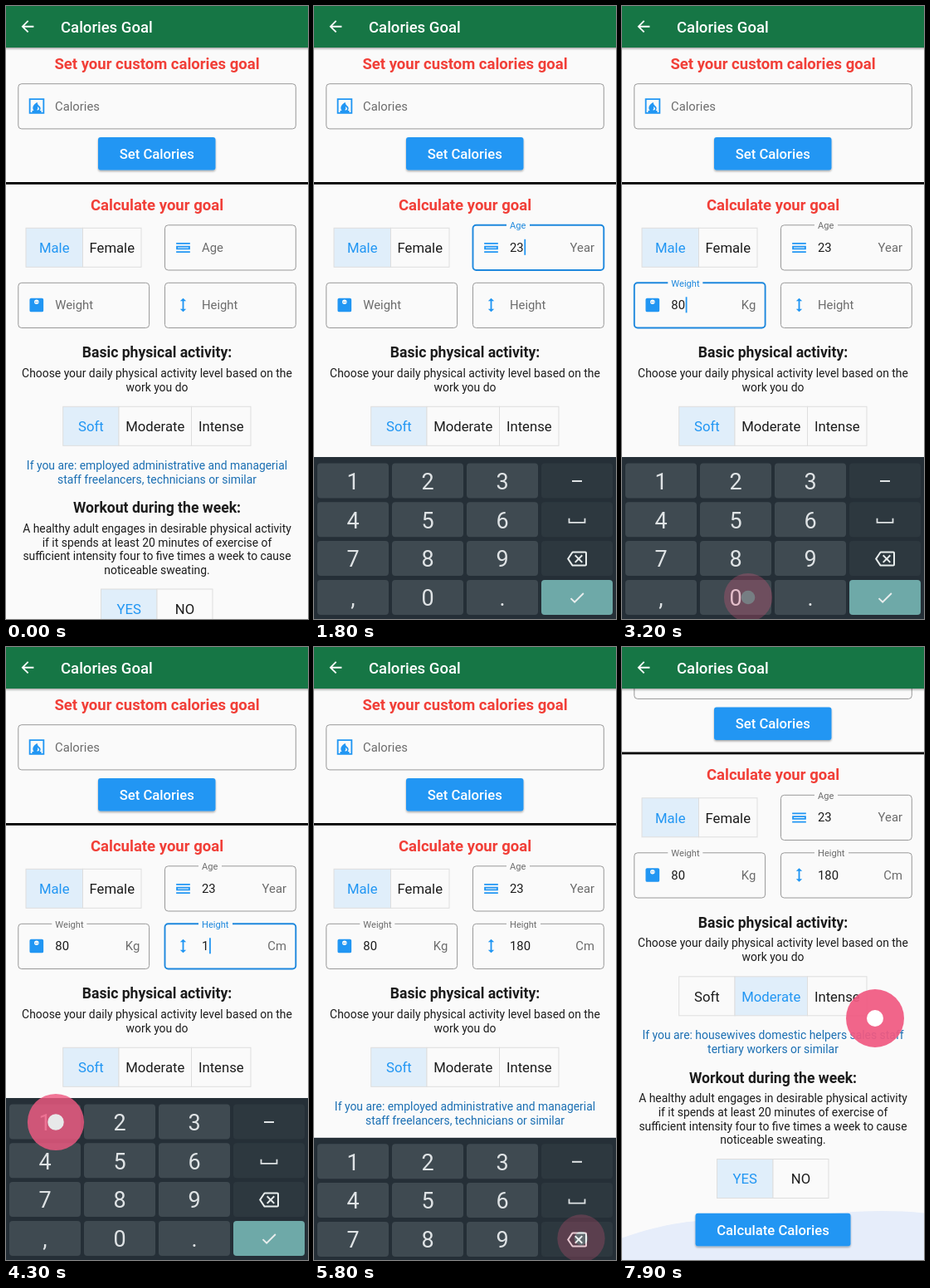
An HTML page for the animation above (8000 ms loop, 364 px wide and 738 px high).

```html
<!DOCTYPE html>
<html lang="en">
<head>
<meta charset="utf-8">
<title>Calories Goal</title>
<style>
html, body { margin: 0; height: 100%; overflow: hidden; background: #fafafa; }
svg { display: block; width: 100vw; height: 100vh; font-family: Roboto, sans-serif; }
</style>
</head>
<body>
<svg id="stage" viewBox="0 0 364 738"></svg>
<script>
const LOOP = 8000;
const BLUE = '#2196f3', INK = '#1c1c1c', GREY = '#6c6c6c', PAPER = '#fafafa';
const BODY = 13.9, LABEL = 14.83, BUTTON = 16.69, TITLE = 18.54;

// Text is placed by the middle of its capital letters.
const text = (x, y, s, size, fill = INK, extra = '') =>
  `<text x="${x}" y="${y}" dy=".355em" font-size="${size}" fill="${fill}" ${extra}>${s}</text>`;
const MID = 'text-anchor="middle"';
const centred = (x, y, s, size, fill, weight = 400, extra = '') =>
  text(x, y, s, size, fill, `${MID} font-weight="${weight}" ${extra}`);
const lines = (y, list, fill, id = '') =>
  list.map((s, i) => centred(182, y + i * 16.6, s, BODY, fill, 400, id && `id="${id}${i}"`)).join('');
const rect = (x, y, w, h, fill, extra = '') =>
  `<rect x="${x}" y="${y}" width="${w}" height="${h}" fill="${fill}" ${extra}/>`;
const icon = (x, y, d, fill = BLUE, k = .927) =>
  `<path transform="translate(${x - 12 * k} ${y - 12 * k}) scale(${k})" d="${d}" fill="${fill}" fill-rule="evenodd"/>`;
const button = (x, y, w, s) =>
  rect(x, y, w, 39.5, BLUE, 'rx="3" filter="url(#shadow)"') +
  centred(x + w / 2, y + 20, s, BUTTON, '#fff', 500);

const ICONS = {
  back: 'M20 11H7.83l5.59-5.59L12 4l-8 8 8 8 1.41-1.41L7.83 13H20v-2z',
  fire: 'M2 2v20h20V2H2zm9.86 14.96c.76-.24 1.4-1.04 1.53-1.63.13-.56-.1-1.05-.2-1.6-.08-.46-.07-.85.08-1.28.54 1.21 2.15 1.64 1.98 3.18-.19 1.69-2.11 2.37-3.39 1.33zM20 20h-2v-2h-2.02c.63-.84 1.02-1.87 1.02-3 0-1.89-1.09-2.85-1.85-3.37C12.2 9.61 13 7 13 7c-6.73 3.57-6.02 7.47-6 8 .03.96.49 2.07 1.23 3H6v2H4V4h16v16z',
  age: 'M3 17h18v2H3zM3 6h18v2H3zM3 10h18v5H3zM5 12v1h14v-1z',
  weight: 'M5 3h14q2 0 2 2v14q0 2-2 2H5q-2 0-2-2V5q0-2 2-2zM12 5a3 3 0 0 0 0 6 3 3 0 0 0 0-6zM10 7.6h1v1h-1zM11.5 7.6h1v1h-1zM13 7.6h1v1h-1z',
  height: 'M13 6.99h3L12 3 8 6.99h3v10.02H8L12 21l4-3.99h-3V6.99z',
  erase: 'M22 3H7c-.69 0-1.23.35-1.59.88L0 12l5.41 8.11c.36.53.9.89 1.59.89h15c1.1 0 2-.9 2-2V5c0-1.1-.9-2-2-2zm0 16H7.07L2.4 12l4.66-7H22v14zm-11.59-2L14 13.41 17.59 17 19 15.59 15.41 12 19 8.41 17.59 7 14 10.59 10.41 7 9 8.41 12.59 12 9 15.59z',
  check: 'M9 16.17 4.83 12l-1.42 1.41L9 19 21 7l-1.41-1.41z'
};

// Taps: time, x, y; each acts when the finger lifts.
const LIFT = 130, FADE = 250;
const TAPS = [
  [150, 270, 291], [1150, 150, 572], [1400, 240, 572],
  [2150, 100, 360], [2560, 152, 665], [2930, 152, 712],
  [3750, 270, 360], [4150, 60, 572], [4480, 152, 665], [4830, 152, 712],
  [5520, 322, 712], [6575, 195, 506]
];
const lift = i => TAPS[i][0] + LIFT;

const FIELDS = [
  { id: 'age', x: 191.5, y: 263.8, label: 'Age', gap: 28, unit: 'Year', value: '23', on: lift(0), off: lift(3), keys: [lift(1), lift(2)] },
  { id: 'weight', x: 14.8, y: 333.3, label: 'Weight', gap: 42, unit: 'Kg', value: '80', on: lift(3), off: lift(6), keys: [lift(4), lift(5)] },
  { id: 'height', x: 191.5, y: 333.3, label: 'Height', gap: 41, unit: 'Cm', value: '180', on: lift(6), off: lift(10), keys: [lift(7), lift(8), lift(9)] }
];
const outline = (x, y, w, id) =>
  rect(x, y, w, 54.2, 'none', `id="${id}Box" rx="4" stroke="#999" stroke-width="1"`);
const field = f =>
  outline(f.x, f.y, 157.8, f.id) +
  rect(f.x + 40.5, f.y - 3, f.gap, 6, PAPER, `id="${f.id}Gap"`) +
  icon(f.x + 22, f.y + 26.7, ICONS[f.id]) +
  text(f.x + 44.5, f.y + 26.7, f.label, LABEL, GREY, `id="${f.id}Label"`) +
  text(f.x + 44.5, f.y + 26.5, '', LABEL, INK, `id="${f.id}Value"`) +
  text(f.x + 146.5, f.y + 26.5, f.unit, LABEL, GREY, `id="${f.id}Unit" text-anchor="end"`) +
  rect(0, f.y + 17, 1.8, 19, BLUE, `id="${f.id}Caret"`);

// Segmented control: edges of the segments, names, chosen one.
const toggle = (id, y, edges, names, chosen) =>
  names.map((s, i) => {
    const w = edges[i + 1] - edges[i];
    return rect(edges[i], y, w, 47, i === chosen ? '#e0eefa' : PAPER, `id="${id}Seg${i}" stroke="#dedede"`) +
      centred(edges[i] + w / 2, y + 23.8, s, BUTTON, i === chosen ? BLUE : INK, 400, `id="${id}Name${i}"`);
  }).join('');

const JOBS = [
  ['If you are: employed administrative and managerial', 'staff freelancers, technicians or similar'],
  ['If you are: housewives domestic helpers sales staff', 'tertiary workers or similar']
];

const keyboard = () => {
  const rows = ['123-', '456_', '789<', ',0.!'];
  let s = rect(0, 543, 364, 195, '#252f37');
  rows.forEach((row, r) => [...row].forEach((k, c) => {
    const x = 4 + c * 90, y = 550.5 + r * 46.8, cx = x + 43, cy = y + 21.5;
    s += rect(x, y, 86, 42, k === '!' ? '#6ea9a8' : c === 3 ? '#2d383f' : '#3f4a51', 'rx="4"');
    if (c < 3) s += centred(cx, cy + .3, k, 27, '#dfe3e5');
    else if (k === '-') s += rect(cx - 6, cy - 1, 12, 2, '#dfe3e5');
    else if (k === '_') s += `<path d="M${cx - 9.5} ${cy - 2}v5h19v-5" fill="none" stroke="#dfe3e5" stroke-width="1.8"/>`;
    else s += icon(cx, cy, k === '<' ? ICONS.erase : ICONS.check, '#e8eded', k === '<' ? 1 : .95);
  }));
  return s;
};

stage.innerHTML = `
<defs><filter id="shadow" x="-10%" y="-20%" width="120%" height="160%">
  <feDropShadow dx="0" dy="1.5" stdDeviation="1.3" flood-opacity=".35"/></filter></defs>
<g id="page">
  <path d="M0 797C60 776 100 774 150 775S280 758 364 767V900H0Z" fill="#e6edfa"/>
  ${centred(182, 69, 'Set your custom calories goal', TITLE, '#f13f38', 700)}
  ${outline(14.8, 93.7, 334.5, 'calories')}
  ${icon(37, 120.5, ICONS.fire)}
  ${text(59, 120.3, 'Calories', LABEL, GREY)}
  ${button(111, 158, 141.5, 'Set Calories')}
  ${rect(0, 212, 364, 2.8, '#000')}
  ${centred(182, 239, 'Calculate your goal', TITLE, '#f13f38', 700)}
  ${toggle('sex', 267.3, [24, 92.5, 163], ['Male', 'Female'], 0)}
  ${FIELDS.map(field).join('')}
  ${centred(182, 417, 'Basic physical activity:', 17.6, INK, 700)}
  ${lines(442, ['Choose your daily physical activity level based on the', 'work you do'], INK)}
  ${toggle('level', 482.3, [68.7, 136, 223.5, 295], ['Soft', 'Moderate', 'Intense'], 0)}
  ${lines(553, JOBS[0], '#1b6fb3', 'job')}
  ${centred(182, 604, 'Workout during the week:', 17.6, INK, 700)}
  ${lines(629, ['A healthy adult engages in desirable physical activity', 'if it spends at least 20 minutes of exercise of',
    'sufficient intensity four to five times a week to cause', 'noticeable sweating.'], INK)}
  ${toggle('sport', 702, [114.5, 182, 249], ['YES', 'NO'], 0)}
  ${button(88.5, 767.3, 187, 'Calculate Calories')}
</g>
${rect(-5, -5, 374, 55, '#197645', 'filter="url(#shadow)"')}
${icon(26, 24.7, ICONS.back, '#fff')}
${text(66, 25, 'Calories Goal', TITLE, '#fff', 'font-weight="500"')}
<g id="keys">${keyboard()}</g>
<g id="finger"><circle r="35" fill="#f05a82" fill-opacity=".93"/><circle r="10" fill="#fff"/></g>`;

const $ = id => document.getElementById(id);
const set = (id, attrs) => { for (const k in attrs) $(id).setAttribute(k, attrs[k]); };
const ramp = (t, from, length) => Math.min(1, Math.max(0, (t - from) / length));
const easeOut = p => 1 - (1 - p) ** 3;
const smooth = p => p * p * (3 - 2 * p);

function drawField(f, t) {
  const focus = t >= f.on && t < f.off;
  const p = smooth(ramp(t, f.on, 180));
  const typed = f.keys.filter(k => t >= k);
  const last = typed.length ? typed[typed.length - 1] : f.on;
  const gap = f.gap * p;
  set(f.id + 'Box', { stroke: focus ? '#1e88dd' : '#999', 'stroke-width': focus ? 1.9 : 1 });
  set(f.id + 'Gap', { x: f.x + 40.5 + (f.gap - gap) / 2, width: gap });
  set(f.id + 'Label', { y: f.y + 26.7 * (1 - p) + .7 * p, 'font-size': LABEL * (1 - p / 4), fill: focus ? '#1e88dd' : GREY });
  set(f.id + 'Unit', { opacity: p });
  $(f.id + 'Value').textContent = f.value.slice(0, typed.length);
  set(f.id + 'Caret', {
    x: f.x + 44.5 + typed.length * 8.33 + .7,
    opacity: focus && (t - last) % 1000 < 500 ? 1 : 0
  });
}

function drawFinger(t, drag) {
  let x = 0, y = 0, life = 0;
  if (t >= 7370) {
    [x, y, life] = [300 + drag / 21, 552 - drag, ramp(t, 7350, 60)];
  } else {
    const tap = TAPS.filter(a => t >= a[0]).pop();
    if (tap) {
      [, x, y] = tap;
      life = Math.min(ramp(t, tap[0] - 30, 60), 1 - ramp(t, tap[0] + LIFT, FADE));
    }
  }
  set('finger', { transform: `translate(${x} ${y}) scale(${.7 + .3 * life})`, opacity: life ** 1.5 });
}

function draw(t) {
  const drag = 105 * smooth(ramp(t, 7390, 510));
  set('page', { transform: `translate(0 ${-Math.max(0, drag - 19.5)})` });
  FIELDS.forEach(f => drawField(f, t));

  const level = t >= lift(11) ? 1 : 0;
  for (let i = 0; i < 3; i++) {
    set('levelSeg' + i, { fill: i === level ? '#e0eefa' : PAPER });
    set('levelName' + i, { fill: i === level ? BLUE : INK });
  }
  JOBS[level].forEach((s, i) => { $('job' + i).textContent = s; });

  const shown = easeOut(ramp(t, 400, 260)) - smooth(ramp(t, 5730, 220));
  set('keys', { transform: `translate(0 ${195 * (1 - shown)})` });
  drawFinger(t, drag);
}

function tick() {
  draw(performance.now() % LOOP);
  requestAnimationFrame(tick);
}
tick();
</script>
</body>
</html>
```
